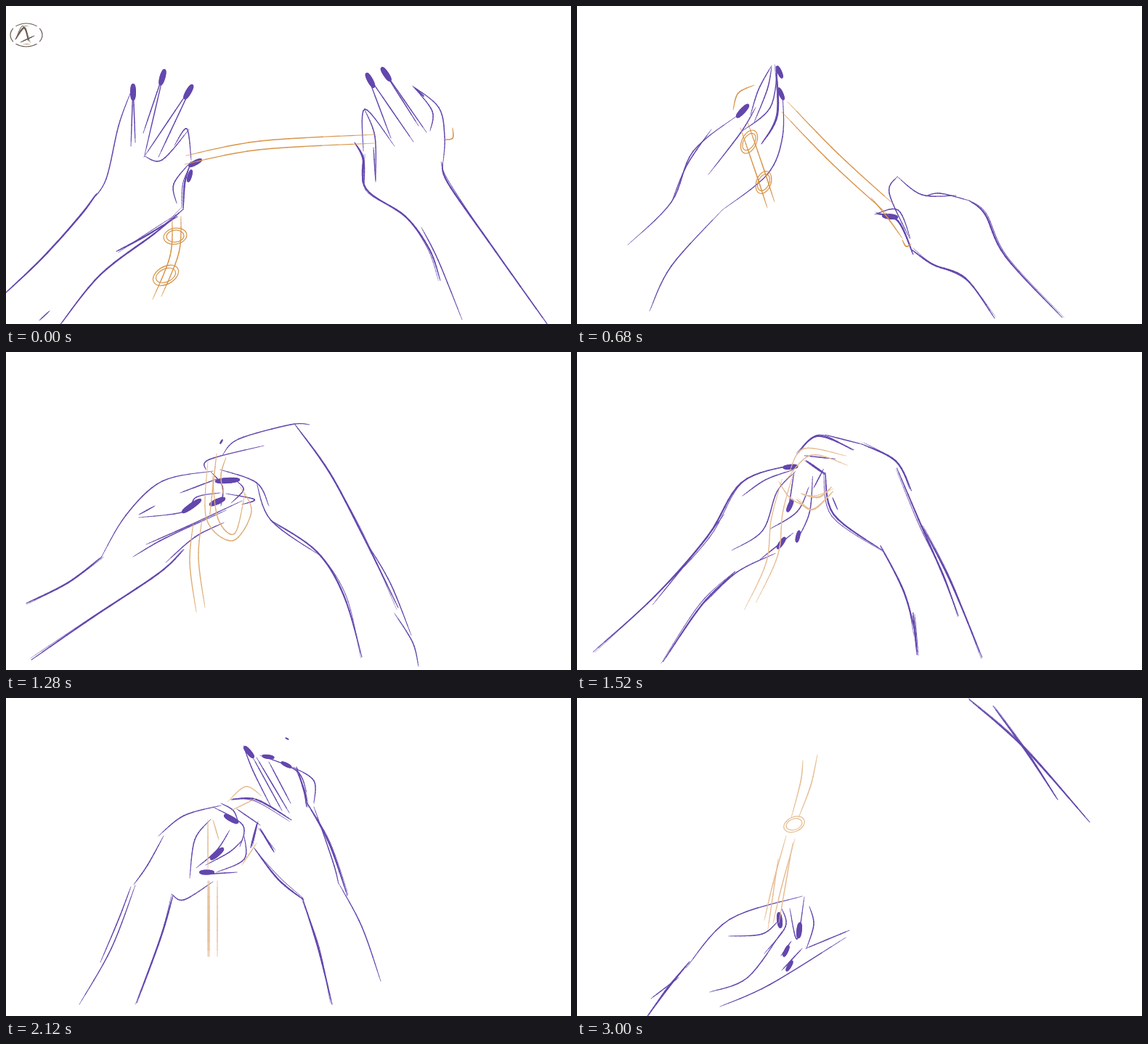
An HTML page with a canvas for the animation above (3.24 s loop, 778 px wide and 438 px high).

```html
<!DOCTYPE html>
<html lang="en">
<head>
<meta charset="utf-8">
<title>Hands tying a cord</title>
<style>
html, body { margin: 0; width: 100%; height: 100%; overflow: hidden; background: #fff; }
canvas { display: block; }
</style>
</head>
<body>
<canvas id="stage" width="778" height="438"></canvas>
<script>
const ctx = document.getElementById('stage').getContext('2d');
const LOOP = 3240, STEP = 40;
const INK = '#6347ad', NOTE = '#6a5c4e', CORD = '#d8954a', PALE = '#e6bd93';

const spline = (a, b, c, d, u) =>
  b + u / 2 * (c - a + u * (2 * a - 5 * b + 4 * c - d + u * (3 * (b - c) + d - a)));

// Smooth line through the points, thinner at both ends.
function brush(width, xy) {
  const last = xy.length / 2 - 1, steps = last * 8;
  const coord = (i, axis) => xy[2 * Math.max(0, Math.min(last, i)) + axis];
  const point = k => {
    const i = Math.min(last - 1, Math.floor(k / 8)), u = k / 8 - i;
    return [0, 1].map(a => spline(coord(i - 1, a), coord(i, a), coord(i + 1, a), coord(i + 2, a), u));
  };
  for (let k = 0; k < steps; k++) {
    ctx.lineWidth = width * (.3 + .7 * Math.sin(Math.PI * (k + .5) / steps) ** .6);
    ctx.beginPath();
    ctx.moveTo(...point(k));
    ctx.lineTo(...point(k + 1));
    ctx.stroke();
  }
}

const line = (...xy) => brush(1.5, xy);
// Bold line with a loose second pass.
const arm = (...xy) => {
  brush(2.3, xy);
  brush(1, xy.map((v, i) => v + 2.5 * Math.sin(i * 2 + v)));
};
const nail = (x, y, x2, y2) => brush(Math.min(8, Math.hypot(x2 - x, y2 - y) * .42), [x, y, x2, y2]);
const finger = (ax, ay, x, y, bx, by) => {
  line(ax, ay, x, y);
  line(x, y, bx, by);
  const dx = (ax + bx) / 2 - x, dy = (ay + by) / 2 - y, k = 19 / Math.hypot(dx, dy);
  nail(x, y, x + dx * k, y + dy * k);
};
// Both edges of the cord.
const cord = (dx, dy, ...xy) => {
  line(...xy);
  line(...xy.map((v, i) => v + (i % 2 ? dy : dx)));
};
const knot = (x, y, rx, ry, tilt) => {
  for (const k of [1, .75]) {
    ctx.lineWidth = 1.2;
    ctx.beginPath();
    ctx.ellipse(x, y, rx * k, ry * k, (tilt + 20 - 20 * k) * Math.PI / 180, 0, 7);
    ctx.stroke();
  }
};

const part = (color, x, y, turn, draw) => ({ color, at: [x, y, turn], draw });

// Left hand, right hand and cord of each pose, with their pivots.
const poses = [
  [
    part(INK, 190, 220, -75, () => {
      arm(-8, 402, 50, 347, 103, 288, 125, 258);
      line(118, 268, 138, 238, 155, 165, 172, 118);
      arm(74, 440, 130, 370, 205, 313, 244, 280);
      arm(152, 338, 190, 318, 236, 290);
      line(46, 433, 60, 420);
      arm(244, 280, 246, 245, 252, 222);
      line(235, 272, 231, 245, 255, 214);
      nail(253, 220, 268, 212);
      nail(251, 241, 255, 227);
      line(191, 207, 215, 212, 252, 170);
      line(232, 192, 249, 169, 255, 212);
      finger(172, 193, 175, 109, 178, 188);
      finger(189, 175, 218, 89, 191, 205);
      finger(190, 208, 256, 110, 210, 208);
    }),
    part(INK, 545, 200, 58, () => {
      arm(601, 215, 608, 243, 665, 325, 745, 438);
      arm(492, 205, 496, 252, 550, 290, 583, 335, 598, 378);
      line(572, 305, 595, 350, 628, 432);
      line(560, 110, 596, 140, 604, 180, 602, 215);
      arm(480, 188, 492, 210, 493, 245);
      line(506, 195, 509, 242);
      line(492, 200, 494, 142, 535, 193);
      line(494, 143, 508, 180, 509, 240);
      finger(530, 182, 497, 94, 561, 187);
      finger(568, 165, 518, 86, 579, 174);
      line(560, 111, 575, 124, 564, 114, 576, 122);
      line(562, 112, 587, 145, 584, 172);
    }),
    part(CORD, 248, 212, -5, () => {
      cord(-2, 12, 248, 206, 350, 186, 509, 177);
      line(603, 184, 615, 182, 615, 168);
      cord(-12, 4, 241, 290, 238, 340, 214, 400);
      knot(233, 317, 16, 11, -10);
      knot(220, 371, 19, 12, -30);
    })
  ],
  [
    part(INK, 220, 210, -60, () => {
      line(70, 329, 130, 270, 160, 200, 222, 150);
      line(131, 268, 152, 218, 185, 170);
      line(100, 420, 130, 358, 200, 281);
      line(200, 281, 262, 232, 283, 180, 283, 120);
      nail(221, 152, 235, 137);
      line(181, 232, 225, 175, 246, 140);
      line(228, 172, 266, 140, 276, 88);
      line(239, 150, 250, 115, 268, 82);
      line(244, 160, 262, 115, 268, 84);
      arm(254, 190, 276, 150, 274, 83);
      nail(276, 84, 282, 98);
      nail(278, 114, 284, 128);
    }),
    part(INK, 445, 285, 40, () => {
      arm(540, 268, 562, 287, 590, 345, 668, 429);
      line(480, 262, 500, 258, 540, 268);
      arm(460, 335, 490, 356, 535, 375, 575, 430);
      line(458, 320, 430, 258, 441, 235);
      line(441, 235, 475, 260, 522, 261);
      line(410, 287, 442, 281, 459, 320);
      arm(412, 286, 442, 296, 463, 342);
      nail(422, 289, 440, 291);
    }),
    part(CORD, 288, 148, 46, () => {
      cord(-8, 14, 290, 132, 360, 204, 437, 274);
      line(405, 264, 428, 292, 448, 320);
      line(448, 322, 453, 331, 460, 328);
      line(215, 143, 222, 120, 244, 109);
      cord(10, -8, 225, 168, 248, 235, 262, 278);
      knot(237, 187, 10, 17, 25);
      knot(257, 243, 10, 16, 20);
    })
  ],
  [
    part(INK, 235, 235, -40, () => {
      line(130, 285, 165, 225, 215, 178, 285, 164);
      arm(28, 346, 85, 318, 132, 282);
      arm(35, 424, 120, 365, 210, 305, 245, 272);
      line(220, 290, 260, 255, 300, 235);
      line(175, 282, 220, 256, 303, 218);
      line(183, 228, 245, 220, 262, 200, 295, 194);
      line(183, 224, 205, 212);
      nail(244, 220, 267, 204);
      nail(282, 210, 300, 202);
      line(240, 194, 290, 175);
      line(193, 265, 250, 240, 325, 205);
    }),
    part(INK, 345, 165, 55, () => {
      line(298, 142, 320, 120, 392, 100, 418, 100);
      arm(398, 100, 445, 165, 490, 250, 540, 352);
      line(500, 268, 530, 320, 558, 390);
      line(535, 360, 560, 400, 568, 433);
      line(345, 180, 365, 232, 432, 280);
      arm(365, 232, 428, 275, 465, 335, 490, 420);
      line(275, 162, 280, 148, 355, 129);
      line(295, 162, 345, 180, 362, 212);
      nail(290, 178, 320, 176);
      line(282, 165, 298, 185, 296, 212);
      line(318, 178, 327, 190, 310, 208);
      line(303, 195, 342, 203, 325, 210);
      nail(295, 126, 298, 121);
    }),
    part('#dfae78', 285, 185, 60, () => {
      line(278, 150, 276, 230, 312, 260, 338, 220, 322, 185);
      line(284, 170, 292, 230, 315, 250, 329, 195);
      cord(12, -6, 258, 235, 253, 290, 262, 358);
      line(303, 145, 296, 170, 300, 200);
      line(290, 140, 280, 230);
    })
  ],
  [
    part(INK, 260, 215, -50, () => {
      arm(52, 422, 130, 338, 195, 250, 235, 172, 300, 142);
      line(128, 350, 175, 280, 215, 218);
      arm(149, 427, 195, 345, 237, 295);
      line(200, 340, 240, 295, 290, 265);
      nail(292, 146, 309, 143);
      line(238, 190, 268, 165, 305, 148);
      line(230, 266, 270, 235, 285, 180, 308, 150);
      line(303, 200, 306, 152);
      nail(302, 205, 307, 190);
      line(280, 232, 315, 205, 328, 170);
      nail(293, 257, 301, 243);
      line(270, 275, 312, 235);
      nail(318, 246, 320, 232);
      line(318, 245, 332, 205, 332, 155);
    }),
    part(INK, 375, 175, 62, () => {
      arm(410, 134, 455, 160, 474, 202);
      arm(456, 170, 485, 252, 510, 320, 528, 378);
      arm(485, 250, 520, 330, 557, 437);
      arm(357, 170, 365, 228, 428, 281);
      arm(427, 275, 455, 340, 468, 400);
      arm(466, 370, 468, 428);
      arm(320, 142, 350, 119, 398, 141);
      line(360, 118, 410, 134);
      arm(332, 152, 357, 172);
      line(330, 145, 372, 152);
      line(340, 190, 355, 165);
      line(365, 205, 371, 222);
    }),
    part(PALE, 300, 185, 60, () => {
      cord(16, -10, 238, 355, 268, 290, 275, 230, 290, 175);
      line(296, 175, 330, 142, 380, 156);
      line(300, 165, 320, 133, 378, 143);
      arm(316, 195, 340, 200, 358, 186);
      arm(310, 203, 332, 217, 360, 192);
      line(285, 178, 300, 200, 320, 212);
    })
  ],
  [
    part(INK, 265, 225, -62, () => {
      line(210, 190, 245, 162, 296, 148);
      line(176, 257, 195, 230, 217, 190);
      line(172, 260, 155, 305, 130, 364);
      line(101, 422, 145, 345, 178, 258);
      arm(180, 420, 213, 330, 230, 272);
      line(228, 270, 245, 278, 285, 253);
      line(296, 145, 313, 155, 320, 172);
      nail(302, 162, 318, 171);
      line(285, 150, 326, 175, 322, 205);
      line(282, 167, 260, 195, 253, 248);
      nail(283, 221, 298, 208);
      line(262, 234, 290, 210, 308, 182);
      line(275, 230, 308, 212, 326, 195);
      nail(268, 240, 285, 240);
      line(270, 243, 318, 240);
      line(290, 240, 328, 222, 328, 190);
    }),
    part(INK, 385, 170, 67, () => {
      arm(415, 145, 445, 200, 470, 272);
      line(424, 150, 450, 225, 458, 256);
      line(458, 255, 490, 315, 516, 390);
      arm(342, 207, 375, 250, 410, 278);
      arm(408, 275, 430, 345, 449, 422);
      line(327, 66, 340, 100, 365, 150);
      nail(329, 68, 340, 81);
      line(345, 82, 390, 158);
      line(340, 82, 380, 155);
      nail(354, 80, 368, 82);
      line(350, 79, 400, 100, 414, 130);
      nail(380, 89, 392, 95);
      line(395, 95, 424, 114, 424, 145);
      arm(400, 95, 411, 130, 414, 150);
      line(362, 88, 392, 145);
      arm(310, 140, 345, 140, 393, 168);
      line(318, 153, 350, 175);
      arm(346, 172, 337, 206);
      arm(350, 180, 369, 212);
      nail(385, 55, 389, 57);
    }),
    part(PALE, 305, 180, 60, () => {
      cord(13, 0, 278, 252, 278, 356);
      cord(1, 0, 279, 252, 279, 356);
      line(305, 143, 330, 122, 352, 135);
      line(310, 155, 345, 138);
      line(278, 168, 278, 235);
      line(285, 168, 293, 195);
      line(325, 230, 345, 200);
    })
  ],
  [
    part(INK, 235, 230, -58, () => {
      line(148, 280, 195, 210, 250, 168);
      arm(77, 417, 125, 340, 183, 248);
      line(90, 410, 152, 310);
      arm(148, 430, 175, 378, 212, 324);
      line(200, 327, 265, 265, 330, 222);
      line(230, 316, 272, 258);
      line(155, 275, 190, 243, 230, 225, 234, 200);
      nail(236, 193, 235, 214);
      arm(282, 240, 326, 224);
      line(205, 307, 220, 258);
      line(210, 262, 243, 240, 242, 207);
      line(252, 168, 268, 214, 256, 185);
      line(270, 185, 285, 210, 270, 240);
      line(285, 215, 296, 225, 280, 240);
      nail(257, 249, 265, 234);
    }),
    part(INK, 365, 120, 57, () => {
      arm(413, 57, 490, 130, 537, 225);
      arm(464, 110, 525, 195, 558, 365);
      line(476, 108, 535, 215, 561, 320);
      arm(332, 138, 365, 154, 432, 160);
      line(430, 160, 460, 220, 483, 355);
      arm(453, 220, 475, 362);
      line(309, 140, 315, 90, 345, 67, 410, 66);
      line(337, 65, 345, 57, 415, 57);
      nail(303, 157, 320, 143);
      line(300, 157, 350, 134);
      line(326, 94, 340, 108, 330, 126);
      arm(335, 98, 330, 122);
      arm(316, 152, 328, 174);
      arm(333, 145, 351, 160);
    }),
    part(PALE, 265, 185, 45, () => {
      line(221, 165, 250, 198, 325, 162);
      line(232, 178, 265, 198, 330, 150);
      line(246, 195, 265, 135, 310, 115);
      line(255, 185, 275, 135, 310, 122);
      line(270, 195, 270, 160, 308, 135);
      line(240, 190, 230, 165, 250, 142);
      cord(12, -4, 250, 190, 262, 280, 283, 364);
      line(246, 235, 276, 340);
    })
  ],
  [
    part(INK, 260, 330, -35, () => {
      arm(97, 438, 125, 400, 155, 363);
      line(150, 372, 210, 305, 310, 273);
      line(102, 414, 140, 385);
      line(183, 405, 235, 385, 282, 322);
      line(197, 425, 265, 395, 370, 330);
      line(209, 328, 255, 325, 278, 306);
      nail(278, 297, 280, 315);
      line(282, 290, 287, 315, 258, 352);
      line(315, 345, 375, 320);
      line(293, 290, 303, 332, 313, 274);
      nail(307, 311, 305, 329);
      line(320, 287, 326, 312, 316, 345);
      nail(291, 342, 285, 355);
      nail(296, 363, 289, 375);
      line(281, 355, 295, 335);
      line(282, 375, 310, 345);
    }),
    part(INK, 490, 64, 45, () => {
      arm(540, 2, 615, 68, 706, 171);
      arm(573, 11, 620, 76, 662, 140);
    }),
    part(PALE, 295, 175, 60, () => {
      line(311, 86, 308, 115, 295, 165);
      line(331, 78, 322, 120, 305, 165);
      knot(299, 174, 15, 10, -25);
      cord(12, 4, 288, 190, 270, 255, 258, 306);
      line(297, 200, 278, 310);
      line(277, 222, 263, 318);
    })
  ]
];

// Notes appear only while their pose is held.
const notes = {
  0() {
    ctx.strokeStyle = NOTE;
    knot(28, 40, 22, 16, 0);
    ctx.clearRect(10, 28, 36, 24);
    arm(13, 46, 25, 30, 31, 48);
    line(20, 50, 39, 41);
  },
  5() {
    ctx.strokeStyle = PALE;
    cord(0, 5, 53, 258, 135, 260);
    line(115, 255, 137, 261, 122, 276);
  }
};

// Time and position along the poses; equal positions are holds.
const keys = [
  [0, 0], [360, .3], [480, .3], [680, 1], [760, 1], [1000, 1.65], [1240, 1.65], [1280, 2],
  [1320, 2], [1720, 3], [1920, 3], [2120, 4], [2440, 5], [2760, 5], [3000, 6], [LOOP, 6]
];

function positionAt(time) {
  const i = keys.findIndex(([t]) => t > time);
  const [t0, p0] = keys[i - 1], [t1, p1] = keys[i];
  return p0 + (p1 - p0) * (time - t0) / (t1 - t0);
}

function draw(position) {
  ctx.clearRect(0, 0, 778, 438);
  if (notes[position]) notes[position]();
  const from = Math.floor(position), to = Math.ceil(position), mix = position - from;
  poses[Math.round(position)].forEach(({ color, at, draw }, i) => {
    const [x, y, turn] = poses[from][i].at.map((v, j) => v + (poses[to][i].at[j] - v) * mix);
    ctx.save();
    ctx.translate(x, y);
    ctx.rotate((turn - at[2]) * Math.PI / 180);
    ctx.translate(-at[0], -at[1]);
    ctx.strokeStyle = color;
    draw();
    ctx.restore();
  });
}

ctx.lineCap = 'round';
const start = performance.now();
function tick() {
  const time = (performance.now() - start) % LOOP;
  draw(positionAt(Math.floor(time / STEP) * STEP));
  requestAnimationFrame(tick);
}
tick();
</script>
</body>
</html>
```
